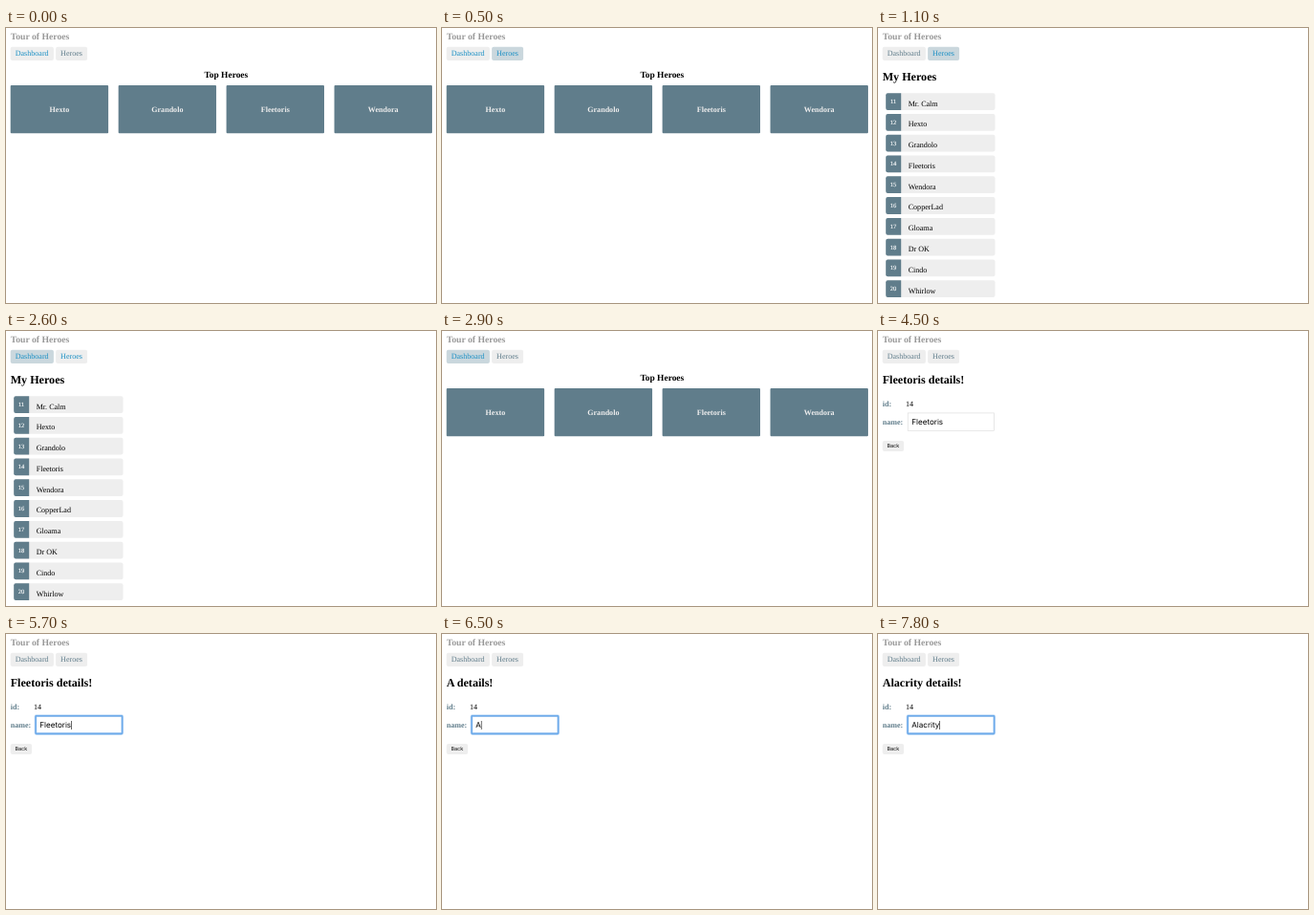
An HTML page that plays this animation: 450x288 px, repeating every 8000 ms.

```html
<!DOCTYPE html>
<html lang="en">
<head>
<meta charset="utf-8">
<title>Tour of Heroes</title>
<style>
  html, body { margin: 0; width: 100%; height: 100%; overflow: hidden; background: #fff; }
  svg { display: block; width: 450px; height: 288px; }
  text { font: 8.07px "Liberation Serif", "Times New Roman", serif; text-rendering: geometricPrecision; white-space: pre; }
  .bold { font-weight: bold; }
  .title { font-size: 9.68px; font-weight: bold; fill: #999; }
  .h2 { font-size: 12.1px; font-weight: bold; }
  .h3 { font-size: 9.44px; font-weight: bold; }
  .mid { text-anchor: middle; }
  .slate { fill: #607d8b; }
  .pale { fill: #eee; }
  .badge { font-size: 6.45px; fill: #fff; stroke: #fff; stroke-width: .15; }
  .input { font-family: Inter, "Liberation Sans", sans-serif; }
  .button { font: 5.4px Inter, "Liberation Sans", sans-serif; }
  .tab rect { fill: #eee; }
  .tab text { fill: #607d8b; }
  .tab.hover rect { fill: #cad7dd; }
  .tab.hover text, .tab.active text { fill: #1a8fc4; }
  .card rect { fill: #607d8b; }
  .card text { fill: #eee; }
  .card.hover rect { fill: #eee; }
  .card.hover text { fill: #607d8b; }
  .field { fill: #fff; stroke: #ddd; stroke-width: .7; }
  .glow, .ring { fill: none; stroke: #6daaea; stroke-width: 1.6; }
  .glow { stroke-width: 2.6; opacity: .4; }
  .mark { fill: #b3d7ff; }
</style>
</head>
<body>
<svg id="stage" viewBox="0 0 450 288"></svg>
<script>
const LOOP = 8000;
const LEFT = 4.7;
const stage = document.getElementById('stage');
const heroes = ['Mr. Calm', 'Hexto', 'Grandolo', 'Fleetoris', 'Wendora',
  'CopperLad', 'Gloama', 'Dr OK', 'Cindo', 'Whirlow'];
const FIRST_ID = 11;
const chosen = 3;
const renamed = 'Alacrity';

// Each step changes only the listed properties.
const steps = [
  [0, { page: 'dashboard', hover: '', name: heroes[chosen], focus: false, selected: false }],
  [500, { hover: 'Heroes' }],
  [1100, { page: 'heroes' }],
  [2300, { hover: '' }],
  [2600, { hover: 'Dashboard' }],
  [2900, { page: 'dashboard' }],
  [3700, { hover: '' }],
  [3900, { hover: heroes[chosen] }],
  [4500, { page: 'detail', hover: '' }],
  [5700, { focus: true }],
  [5800, { selected: true }],
  [6500, { selected: false, name: renamed.slice(0, 1) }],
  ...[[6800, 2], [6900, 3], [7100, 4], [7300, 5], [7400, 6], [7800, 8]]
    .map(([time, count]) => [time, { name: renamed.slice(0, count) }])
];

function add(parent, tag, attrs, content = '') {
  const node = document.createElementNS('http://www.w3.org/2000/svg', tag);
  for (const key in attrs) node.setAttribute(key, attrs[key]);
  node.textContent = content;
  return parent.appendChild(node);
}

const label = (parent, x, y, content, cls = '') =>
  add(parent, 'text', { x, y, class: cls }, content);

const box = (parent, x, y, width, height, cls = '', rx = 0) =>
  add(parent, 'rect', { x, y, width, height, class: cls, rx });

const group = (parent, cls = '') => add(parent, 'g', { class: cls });

function makeTab(x, width, name) {
  const tab = group(stage);
  box(tab, x, 19.8, width, 14.2, '', 2);
  label(tab, x + 5, 29.3, name);
  return tab;
}

function makeDashboard() {
  const page = group(stage);
  label(page, 230.3, 52.1, 'Top Heroes', 'h3 mid');
  const cards = heroes.slice(1, 5).map((name, i) => {
    const x = LEFT + i * 112.95;
    const card = group(page, 'card');
    box(card, x, 60, 102.4, 50.3, '', 1);
    label(card, x + 51.2, 87.8, name, 'bold mid');
    return { name, card };
  });
  return { page, cards };
}

function makeList() {
  const page = group(stage);
  label(page, LEFT, 55.2, 'My Heroes', 'h2');
  heroes.forEach((name, i) => {
    const y = 68.2 + i * 21.78;
    box(page, 8.2, y, 114.3, 17.8, 'pale', 2);
    add(page, 'path', { class: 'slate', d: `M24.2 ${y}h-14a2 2 0 0 0-2 2v13.8a2 2 0 0 0 2 2h14z` });
    label(page, 16, y + 10.9, FIRST_ID + i, 'badge mid');
    label(page, 31.7, y + 13.3, name);
  });
  return page;
}

function makeDetail() {
  const page = group(stage);
  const heading = label(page, LEFT, 55.2, '', 'h2');
  label(page, LEFT, 79.3, 'id:', 'bold slate');
  label(page, 28.9, 79.3, FIRST_ID + chosen);
  label(page, LEFT, 98, 'name:', 'bold slate');
  box(page, 31.2, 85.9, 90.3, 18.4, 'field');
  const focus = group(page);
  box(focus, 30.9, 85.6, 90.9, 19, 'glow', 1);
  box(focus, 31.1, 85.8, 90.5, 18.6, 'ring', .6);
  const mark = box(page, 35.3, 90.4, 0, 10, 'mark');
  const value = label(page, 35.3, 98.2, '', 'input');
  const caret = box(page, 0, 91, .6, 9);
  box(page, LEFT, 114.9, 22.4, 11, 'pale', 2);
  label(page, LEFT + 11.1, 122.3, 'Back', 'button mid');
  return { page, heading, focus, mark, value, caret };
}

label(stage, LEFT, 12.1, 'Tour of Heroes', 'title');
const tabs = { Dashboard: makeTab(LEFT, 45.2, 'Dashboard'), Heroes: makeTab(52.1, 33, 'Heroes') };
const dashboard = makeDashboard();
const list = makeList();
const detail = makeDetail();

const show = (node, on) => { node.style.display = on ? '' : 'none'; };

function render(state) {
  show(dashboard.page, state.page === 'dashboard');
  show(list, state.page === 'heroes');
  show(detail.page, state.page === 'detail');
  for (const name in tabs) {
    const active = name.toLowerCase() === state.page;
    tabs[name].setAttribute('class',
      'tab' + (active ? ' active' : '') + (state.hover === name ? ' hover' : ''));
  }
  for (const { name, card } of dashboard.cards)
    card.classList.toggle('hover', state.hover === name);

  if (state.page !== 'detail') return;
  detail.heading.textContent = state.name + ' details!';
  detail.value.textContent = state.name;
  const width = detail.value.getComputedTextLength();
  detail.mark.setAttribute('width', width);
  detail.caret.setAttribute('x', 35.3 + width);
  show(detail.focus, state.focus);
  show(detail.mark, state.selected);
  show(detail.caret, state.focus && !state.selected);
}

let shown = -1;
const start = performance.now();

function tick() {
  const time = (performance.now() - start) % LOOP;
  const past = steps.filter(([at]) => at <= time);
  if (past.length !== shown) {
    shown = past.length;
    render(Object.assign({}, ...past.map(step => step[1])));
  }
  requestAnimationFrame(tick);
}
tick();
</script>
</body>
</html>
```
